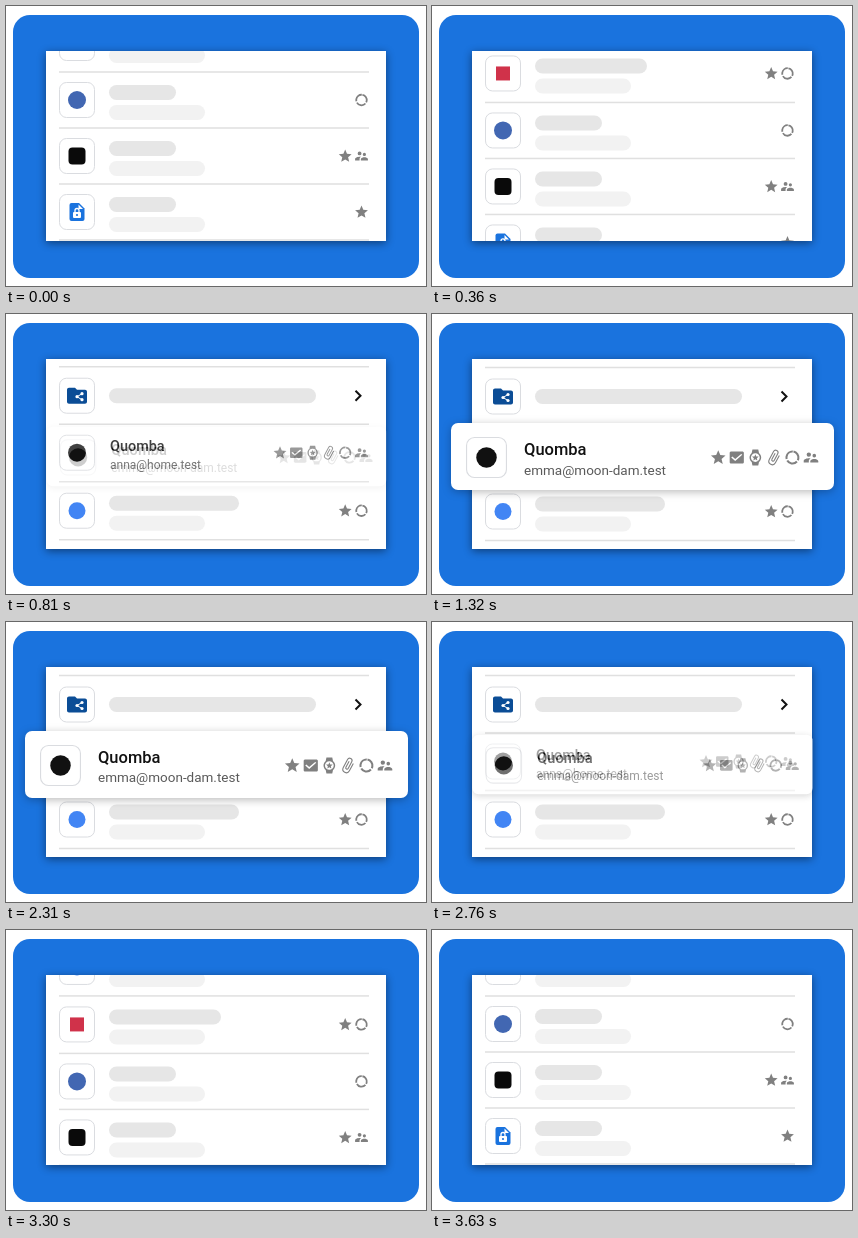
Write an HTML page that moves like this. It is 420x280 px and loops after 3750 ms.

```html
<!DOCTYPE html>
<html lang="en">
<head>
<meta charset="utf-8">
<title>Item list</title>
<style>
  html, body { margin: 0; width: 100%; height: 100%; overflow: hidden; background: #fff; }
  svg { display: block; width: 420px; height: 280px; font-family: Roboto, "Open Sans", sans-serif; }
  .panel { filter: drop-shadow(0 2px 4px #0007); }
  .card { filter: drop-shadow(0 2px 4px #0004); }
  .title { font-size: 14.4px; font-weight: 500; fill: #111; }
  .mail { font-size: 12px; fill: #5a5a5a; }
  .card .title { font-size: 16.5px; }
  .card .mail { font-size: 13.5px; }
</style>
</head>
<body>
<svg viewBox="0 0 420 280">
  <defs><clipPath id="view"><rect x="40" y="45" width="340" height="190"/></clipPath></defs>
  <rect x="7" y="9" width="406" height="263" rx="17" fill="#1a73de"/>
  <rect class="panel" x="40" y="45" width="340" height="190" fill="#fff"/>
  <g clip-path="url(#view)"><g id="list"></g></g>
  <g id="card" class="card"></g>
</svg>
<script>
const STAR = 'M12 17.27L18.18 21l-1.64-7.03L22 9.24l-7.19-.61L12 2 9.19 8.63 2 9.24l5.46 4.73L5.82 21z';
const path = (d, extra = '') => `<path d="${d}" ${extra}/>`;
const at = (x, y, k, body) => `<g transform="translate(${x} ${y}) scale(${k})">${body}</g>`;
const box = (x, y, w, h, r, fill) =>
  `<rect x="${x}" y="${y}" width="${w}" height="${h}" rx="${r}" fill="${fill}"/>`;
const dot = (r, fill) => `<circle r="${r}" fill="${fill}"/>`;
const square = (s, r, fill) => box(-s / 2, -s / 2, s, s, r, fill);

// Small grey status icons on a 24-unit grid
const icons = {
  star: path(STAR),
  check: path('M19 3H5c-1.1 0-2 .9-2 2v14c0 1.1.9 2 2 2h14c1.1 0 2-.9 2-2V5c0-1.1-.9-2-2-2zm-9 14l-5-5 1.4-1.4L10 14.2l7.6-7.6L19 8z',
    'transform="translate(-1 1) scale(1.08 .92)"'),
  watch: path('M20 12c0-2.5-1.2-4.8-3-6.3L16 1H8l-1 4.7C5.2 7.2 4 9.5 4 12s1.2 4.8 3 6.3L8 23h8l1-4.7c1.8-1.5 3-3.8 3-6.3zM6 12a6 6 0 1 1 12 0 6 6 0 0 1-12 0z') +
    at(6.6, 6.6, .45, path(STAR)),
  clip: path('M16.5 6v11.5a4 4 0 0 1-8 0V5a2.5 2.5 0 0 1 5 0v10.5a1 1 0 0 1-2 0V6H10v9.5a2.5 2.5 0 0 0 5 0V5a4 4 0 0 0-8 0v12.5a5.5 5.5 0 0 0 11 0V6z',
    'transform="rotate(28 12 12)"'),
  ring: '<circle cx="12" cy="12" r="8.2" fill="none" stroke="#808080" stroke-width="2.8" pathLength="30" stroke-dasharray="8.8 1.2" transform="rotate(-80 12 12)"/>',
  people: path('M16.5 12a2.5 2.5 0 1 0 0-5 2.5 2.5 0 0 0 0 5zM9 11a3 3 0 1 0 0-6 3 3 0 0 0 0 6zm7.5 3c-1.8 0-5.5.9-5.5 2.8V19h11v-2.2c0-1.9-3.7-2.8-5.5-2.8zM9 13c-2.3 0-7 1.2-7 3.5V19h7v-2.2c0-.9.3-2.4 2.4-3.5C10.5 13.1 9.7 13 9 13z')
};
const ALL = ['star', 'check', 'watch', 'clip', 'ring', 'people'];

const folder = at(-12, -12, 1,
  path('M10 4H4c-1.1 0-2 .9-2 2v12c0 1.1.9 2 2 2h16c1.1 0 2-.9 2-2V8c0-1.1-.9-2-2-2h-8z', 'fill="#0b4d96"') +
  path('M17 10l-5 3 5 3', 'fill="none" stroke="#fff"') +
  [[17, 10], [12, 13], [17, 16]].map(([x, y]) => at(x, y, 1, dot(1.6, '#fff'))).join(''));
const doc =
  path('M-5.5-9H2l5.5 5.5V7q0 2-2 2h-11q-2 0-2-2V-7q0-2 2-2z', 'fill="#1a73de"') +
  path('M1.5-7.5v4.5H6z', 'fill="#fff"') +
  box(-4, 0, 8, 6, 1, '#fff') +
  path('M-2 0v-1.5a2 2 0 0 1 4 0V0', 'fill="none" stroke="#fff" stroke-width="1.3"') +
  at(0, 3, 1, dot(1.1, '#1a73de'));

const tile = (x, y, k, mark) => at(x, y, k,
  '<rect x="-17.5" y="-17.5" width="35" height="35" rx="7" fill="#fff" stroke="#dadce0"/>' + mark);
const status = (names, right, y, step, size) => names.map((n, i) =>
  at(right - (names.length - 1 - i) * step - size / 2, y - size / 2, size / 24,
    `<g fill="#808080">${icons[n]}</g>`)).join('');
const label = (cls, x, y, s) => `<text class="${cls}" x="${x}" y="${y}">${s}</text>`;
const line = y => box(53, y - .75, 310, 1.5, 0, '#e0e0e0');

const brand = dot(9, '#111');
const rows = [
  { y: 82.5, mark: folder, pill: 207, open: true },
  { y: 139.5, mark: brand, text: true, tags: ALL },
  { y: 197.5, mark: dot(8.5, '#4285f4'), pill: 130, tags: ['star', 'ring'] },
  { y: 255, mark: square(14, 0, '#d0324a'), pill: 112, tags: ['star', 'ring'] },
  { y: 312, mark: dot(9, '#4267b2'), pill: 67, tags: ['ring'] },
  { y: 368, mark: square(17, 4, '#0a0a0a'), pill: 67, tags: ['star', 'people'] },
  { y: 424, mark: doc, pill: 67, tags: ['star'] }
];

function row({ y, mark, pill, open, text, tags = [] }) {
  let s = tile(71, y, 1, mark) + status(tags, 355.5, y, 16.3, 15.4);
  if (text) s += label('title', 104, y - 2, 'Quomba') + label('mail', 104, y + 16, 'anna@home.test');
  else if (open) s += box(103, y - 7.5, pill, 15, 7.5, '#e6e6e6') +
    path(`M349.5 ${y - 5}l5 5-5 5`, 'fill="none" stroke="#111" stroke-width="2"');
  else s += box(103, y - 15, pill, 15, 7.5, '#e6e6e6') + box(103, y + 5, 96, 15, 7.5, '#f2f2f2');
  return s;
}

const list = document.getElementById('list');
const card = document.getElementById('card');
list.innerHTML = rows.map(row).join('') +
  [53.5, 111, 168.5, 226.5, 284, 340, 396, 452].map(line).join('');
card.innerHTML = box(19, 109, 383, 67, 7, '#fff') + tile(54.5, 143.5, 1.14, brand) +
  label('title', 92, 141, 'Quomba') + label('mail', 92, 160.5, 'emma@moon-dam.test') +
  status(ALL, 379, 143.5, 18.55, 17.5);

const LOOP = 3750, STEP = 30;
const part = (t, from, to) => Math.min(1, Math.max(0, (t - from) / (to - from)));
const ease = p => p < .5 ? 4 * p ** 3 : 1 - 4 * (1 - p) ** 3;

function draw(now) {
  const t = Math.floor(now % LOOP / STEP) * STEP;
  const scroll = ease(part(t, 105, 885)) - ease(part(t, 2835, 3615));
  const grow = ease(part(t, 765, 1320)) - ease(part(t, 2295, 2850));
  const fade = part(t, 780, 930) - part(t, 2700, 2850);
  const k = .887 + .113 * grow;
  list.setAttribute('transform', `translate(0 ${218 * (scroll - 1)})`);
  card.setAttribute('transform', `translate(210.5 142.5) scale(${k}) translate(-210.5 -142.5)`);
  card.setAttribute('opacity', fade);
}

const start = performance.now();
function tick() {
  draw(performance.now() - start);
  requestAnimationFrame(tick);
}
tick();
</script>
</body>
</html>
```
